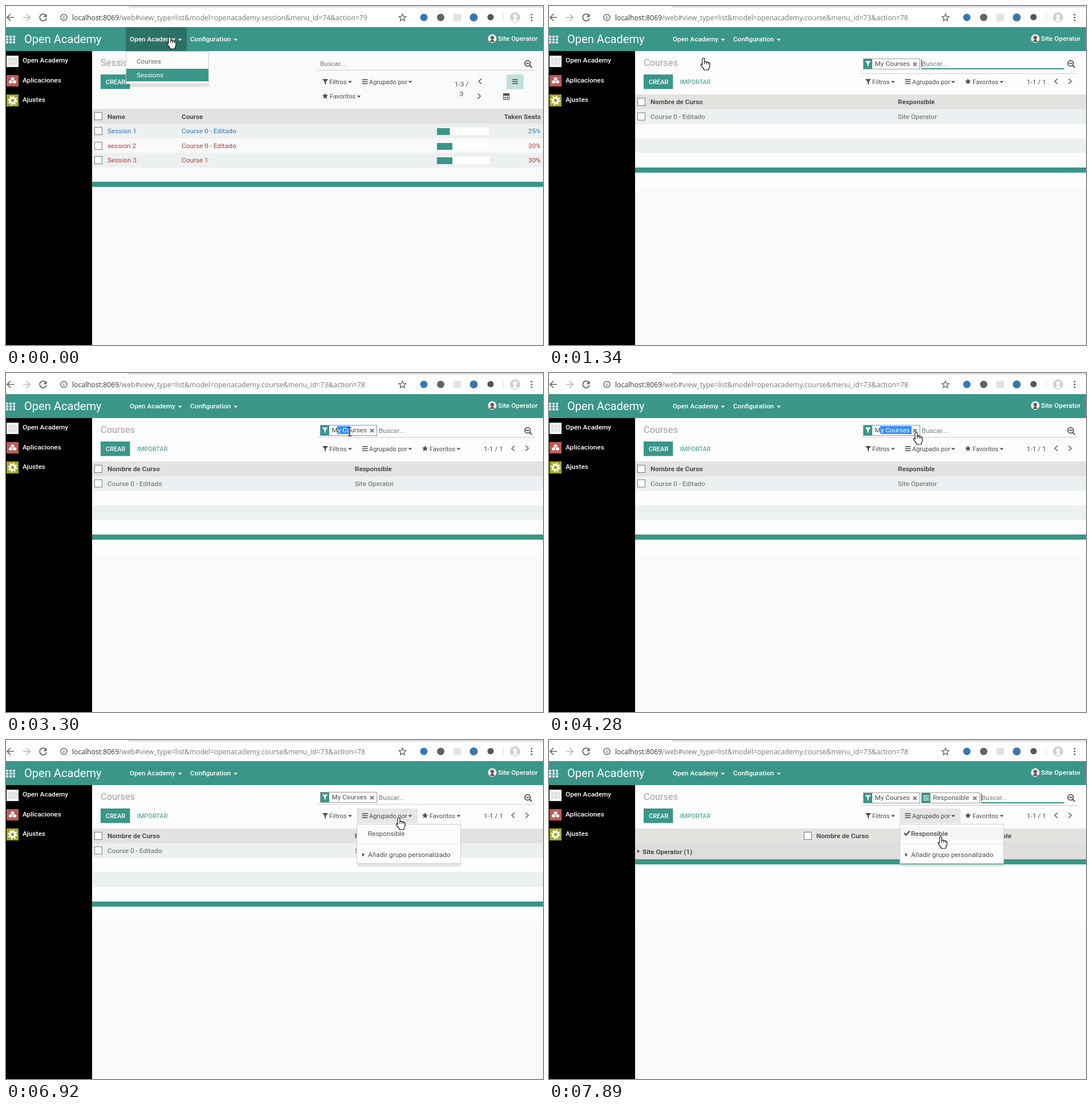
These frames come from a looping animation (942x594 px, 8 s). An HTML page:

```html
<!DOCTYPE html>
<html lang="es">
<head>
<meta charset="utf-8">
<title>Open Academy</title>
<style>
html, body { margin: 0; width: 100%; height: 100%; overflow: hidden; background: #fafafa; }
#stage { display: block; width: 100vw; height: 100vh; }
text { font-family: Roboto, sans-serif; white-space: pre; }
</style>
</head>
<body>
<svg id="stage" viewBox="0 0 942 594"></svg>
<script>
const LOOP = 8000, TEAL = '#3a9688', INK = '#4c4c4c', GREY = '#5f6368', USER = 'Site Operator';

// Cursor runs: start ms, end ms, steps, from x, y, to x, y, shape
const RUNS = [
  [0, 0, 1, 287, 54, 287, 54, 'hand'],
  [250, 920, 5, 286, 61, 271, 91, 'hand'],
  [1900, 2570, 6, 300, 92, 596, 106, 'beam'],
  [2720, 2880, 2, 588, 104, 581, 102, 'beam'],
  [3030, 3740, 6, 583, 102, 634, 104, 'beam'],
  [3890, 3890, 1, 643, 98, 643, 98, 'hand'],
  [4280, 4280, 1, 644, 104, 644, 104, 'hand'],
  [4420, 5130, 6, 605, 128, 600, 252, 'arrow'],
  [5400, 5520, 2, 604, 254, 625, 240, 'arrow'],
  [5800, 5800, 1, 737, 128, 737, 128, 'hand'],
  [5940, 6500, 5, 756, 122, 689, 136, 'hand'],
  [7040, 7440, 3, 689, 148, 687, 169, 'hand'],
];

function cursorAt(t) {
  const [start, end, steps, x0, y0, x1, y1, shape] = RUNS.findLast(run => t >= run[0]);
  const last = Math.max(steps - 1, 1);
  const step = end > start ? Math.min(last, Math.floor((t - start) / (end - start) * last + 0.3)) : 0;
  const f = step / last;
  return { x: Math.round(x0 + (x1 - x0) * f), y: Math.round(y0 + (y1 - y0) * f), shape };
}

const rect = (x, y, w, h, fill, extra = '') =>
  `<rect x="${x}" y="${y}" width="${w}" height="${h}" fill="${fill}" ${extra}/>`;
const box = (x, y, w, h, fill, stroke) => rect(x + .5, y + .5, w - 1, h - 1, fill, `stroke="${stroke}"`);
const disc = (x, y, r, fill, extra = '') => `<circle cx="${x}" cy="${y}" r="${r}" fill="${fill}" ${extra}/>`;
const shape = (d, fill, extra = '') => `<path d="${d}" fill="${fill}" ${extra}/>`;
const line = (d, stroke, width = 1) => shape(d, 'none', `stroke="${stroke}" stroke-width="${width}"`);
const text = (x, y, label, color = INK, size = 11.8, weight = 400, anchor = 'start', extra = '') =>
  `<text x="${x}" y="${y}" fill="${color}" font-size="${size}" font-weight="${weight}" text-anchor="${anchor}" ${extra}>${label}</text>`;
const bold = (x, y, label, anchor) => text(x, y, label, INK, 11.7, 700, anchor);
const at = (x, y, content) => `<g transform="translate(${x} ${y})">${content}</g>`;

const down = (x, y, color = INK) => shape(`M${x - 3.5} ${y - 1.5}h7l-3.500 3.500z`, color);
const right = (x, y) => shape(`M${x - 2} ${y - 3.5}l4 3.500-4 3.500z`, INK);
const chevron = (x, y, dir) => line(`M${x - 2.5 * dir} ${y - 4.5}l${5 * dir} 4.500l${-5 * dir} 4.500`, '#777', 1.7);
const funnel = (x, y, color) => shape(`M${x - 5} ${y - 5}h10l-4 5v5l-2-2v-3z`, color);
const bars = (x, y, color) => line(`M${x - 5} ${y - 3.5}h10m-10 3.500h10m-10 3.500h10`, color, 1.7);
const star = (x, y, r, fill, extra) => {
  const points = Array.from({ length: 10 }, (_, i) => {
    const a = i * Math.PI / 5, d = i % 2 ? r * .45 : r;
    return `${(x + d * Math.sin(a)).toFixed(1)},${(y - d * Math.cos(a)).toFixed(1)}`;
  });
  return `<polygon points="${points.join(' ')}" fill="${fill}" ${extra || ''}/>`;
};
const checkbox = (x, y) => box(x, y, 14, 14, '#fff', '#777');
const person = (x, y, r, back, front) => disc(x, y, r, back) + disc(x, y - r * .2, r * .42, front)
  + shape(`M${x - r * .6} ${y + r * .8}q${r * .6} ${-r * 1.2} ${r * 1.2} 0z`, front);

function browserBar(model, menu, action) {
  const rest = `/web#view_type=list&amp;model=openacademy.${model}&amp;menu_id=${menu}&amp;action=${action}`;
  const arrow = (x, dir, color) => line(`M${x - 6 * dir} 20h${12 * dir}m${-6 * dir}-6l${6 * dir} 6l${-6 * dir} 6`, color, 1.7);
  return rect(0, 0, 942, 37, '#fff') + shape('M214 0H942V3H218q-3 0-4-3z', '#dee1e6')
    + arrow(8, -1, GREY) + arrow(36, 1, '#b5b8bb')
    + line('M70 16.500a6 6 0 1 0 1 5', GREY, 1.8) + shape('M71.500 13.500v6h-6z', GREY)
    + disc(101.5, 20, 5.5, 'none', `stroke="${GREY}" stroke-width="1.4"`) + line('M101.500 19v4m0-6v1.300', GREY, 1.4)
    + text(116, 24.5, `<tspan fill="#333">localhost:8069</tspan>${rest}`, '#777', 12.2, 400, 'start',
      'style="font-family:\'Open Sans\',sans-serif"')
    + star(695.5, 20.5, 6.5, 'none', `stroke="${GREY}" stroke-width="1.3"`)
    + disc(733, 20, 6.5, '#3279b7') + disc(762.5, 20, 6.5, GREY) + rect(785, 13.5, 13, 13, '#e3e3e3')
    + disc(820.5, 20, 7, '#3d77a8') + disc(850, 19.5, 5.5, '#555') + rect(872, 13, 1, 14, '#ddd')
    + person(893, 20, 9, '#cfcfd4', '#f7f7f7')
    + [15, 20, 25].map(y => disc(922, y, 1.6, GREY)).join('');
}

function navigation(menuOpen) {
  let out = rect(0, 37, 942, 42, TEAL) + (menuOpen ? rect(210, 37, 107, 42, '#2b7166') : '');
  for (let i = 0; i < 9; i++) out += rect(i % 3 * 6, 52 + Math.floor(i / 3) * 5, 4, 3.5, '#fff');
  return out + text(32, 65, 'Open Academy', '#fff', 20.1)
    + text(217, 62, 'Open Academy', '#fff', 11.8, 500) + down(305, 59, '#fff')
    + text(323, 62, 'Configuration', '#fff', 11.8, 500) + down(403, 59, '#fff')
    + person(853, 57, 7.5, '#f2f2f2', '#6b5a50') + text(863, 61, USER, '#fff', 11.8, 500);
}

function sidebar() {
  const cube = (x, y) => shape(`M${x} ${y - 3.5}l3.500 1.500v4l-3.500 1.500l-3.500-1.500v-4z`, '#fff', 'stroke="#8f4644" stroke-width=".7"');
  return rect(0, 79, 151, 515, '#000')
    + rect(1, 87, 21, 20, '#f3f3f3') + box(5, 92, 13, 10, 'none', '#c9c9c9') + disc(11.5, 97, 2.5, 'none', 'stroke="#c9c9c9"')
    + rect(1, 121, 21, 20, '#c05a57') + cube(11.5, 128) + cube(8, 133) + cube(15, 133)
    + rect(1, 155, 21, 21, '#a5a71f') + disc(11.5, 165.5, 4.5, 'none', 'stroke="#fff" stroke-width="3"')
    + disc(11.5, 165.5, 7, 'none', 'stroke="#fff" stroke-width="2.600" stroke-dasharray="2.75"')
    + ['Open Academy', 'Aplicaciones', 'Ajustes'].map((s, i) => text(29, 99 + i * 34.5, s, '#fff', 11.8, 500)).join('');
}

function controls(title, stacked, groupActive) {
  const favX = stacked ? 560 : 735, favY = stacked ? 158 : 132.5;
  let out = text(166, 105, title, '#aaa197', 16.4)
    + rect(166, 120, 51.5, 25.5, TEAL) + text(175, 136.5, 'CREAR', '#fff', 11, 500)
    + text(230, 136.5, 'IMPORTAR', TEAL, 11);
  if (groupActive) out += rect(615, 120, 107, 26, '#e6e6e6');
  out += funnel(560, 133, INK) + text(567, 136.5, 'Filtros', INK, 11) + down(603.5, 133)
    + bars(629.5, 132.5, INK) + text(637, 136.5, 'Agrupado por', INK, 11) + down(709, 133)
    + star(favX, favY, 5.5, INK) + text(favX + 8, favY + 4, 'Favoritos', INK, 11) + down(favX + 59, favY + .5);
  if (!stacked) return out + text(838, 136.5, '1-1 / 1') + chevron(889.5, 132, -1) + chevron(914, 132, 1);
  return out + text(799, 141, '1-3 /', INK, 11.8, 400, 'middle') + text(799, 157.5, '3', INK, 11.8, 400, 'middle')
    + chevron(831.5, 132, -1) + chevron(830, 158, 1)
    + rect(878, 120, 30, 26, '#c4e0db') + bars(893, 132.5, INK)
    + box(872, 153, 11, 11, 'none', INK) + rect(872, 154, 11, 3, INK) + line('M872 160.500h11m-7.500-3v7m4-7v7', INK, .8);
}

function facet(x, y, width, label, icon, selectedTo) {
  const selected = selectedTo !== undefined;
  let out = box(x, y, width, 19, '#fff', selected ? '#5b9bdc' : '#999') + rect(x + 1, y + 1, 15, 17, TEAL)
    + icon(x + 8.5, y + 9.5, '#fff') + text(x + 20.5, y + 13, label, INK, 11.7);
  if (selected) {
    const left = x + 30;
    out += `<svg x="${left}" y="${y + 2}" width="${Math.max(selectedTo - left, 0)}" height="14">`
      + rect(0, 0, 99, 14, '#3390ff') + text(-9.5, 11, label, '#fff', 11.7) + '</svg>';
  }
  const cx = x + width - 9;
  return out + line(`M${cx - 3} ${y + 7}l6 6m0-6l-6 6`, '#777', 2);
}

function search({ courses, grouped, focused, caret, selectedTo }) {
  const y = focused ? 92 : 91;
  const inputX = grouped ? 759 : courses ? 654 : 551;
  let out = rect(547, grouped ? 114 : focused ? 118 : 112, 380, 1, '#ccc');
  if (courses) out += facet(551, y, 100, 'My Courses', funnel, selectedTo);
  if (grouped) out += facet(653, y, 103, 'Responsible', bars);
  if (focused) out += rect(inputX - 1, 109, 905 - inputX, 2, TEAL);
  if (caret) out += rect(inputX - 1, 94, 1, 13, '#222');
  return out + text(inputX, 105, 'Buscar...', '#777', 11.7)
    + disc(915, 100.5, 4.8, 'none', `stroke="${INK}" stroke-width="1.8"`) + line('M912.500 100.500h5m1 3.500l4 4', INK, 1.8);
}

function sessionList() {
  const rows = [['Session 1', 'Course 0 - Editado', 25, '#337ab7'], ['session 2', 'Course 0 - Editado', 30, '#b03f3c'],
    ['Session 3', 'Course 1', 30, '#b03f3c']];
  return rect(151, 180, 791, 26, '#e2e2e0') + checkbox(155, 186) + bold(178, 197.5, 'Name') + bold(308, 197.5, 'Course')
    + bold(938, 197.5, 'Taken Seats', 'end')
    + rows.map(([name, course, seats, color], i) => {
      const y = 206 + Math.round(i * 25.5);
      return rect(151, y, 791, 26, i % 2 ? '#fafafa' : '#ecf0f0') + checkbox(155, y + 6)
        + text(178, y + 17, name, color) + text(308, y + 17, course, color)
        + rect(756, y + 7, 91, 13, '#fff') + rect(756, y + 8, seats * .9, 12, TEAL)
        + text(938, y + 17, seats + '%', color, 11.8, 400, 'end');
    }).join('') + rect(151, 308, 791, 9, TEAL);
}

function courseList(hover) {
  const sortMark = x => down(x, 168, '#999');
  return rect(151, 155, 791, 26, '#e2e2e0')
    + (hover === 'name' ? rect(174, 155, 434, 26, '#d5d5d3') + sortMark(279) : '')
    + (hover === 'responsible' ? rect(608, 155, 334, 26, '#d5d5d3') + sortMark(685.5) : '')
    + checkbox(155, 161) + bold(178, 172, 'Nombre de Curso') + bold(612, 172, 'Responsible')
    + rect(151, 181, 791, 26, '#ecf0f0') + checkbox(155, 186.5)
    + text(178, 197.5, 'Course 0 - Editado', '#666') + text(612, 197.5, USER, '#666')
    + rect(151, 232, 791, 25.5, '#ecf0f0') + rect(151, 283, 791, 9, TEAL);
}

function groupedList() {
  return rect(151, 155, 791, 26, '#e2e2e0') + checkbox(447, 161) + bold(469, 172, 'Nombre de Curso')
    + bold(811, 172, 'Responsible', 'end')
    + rect(151, 181, 791, 28, '#dedede') + right(157, 195) + bold(164, 199.5, USER + ' (1)')
    + rect(151, 209, 791, 9, TEAL);
}

const panel = (x, y, w, h) => rect(x + 2, y + 4, w - 2, h + 1, '#000', 'opacity=".1" rx="3"') + box(x, y, w, h, '#fcfcfc', '#ccc');

const academyMenu = hover => panel(210, 79, 146, 58) + (hover ? rect(211, 86, 144, 22, '#eee') : '')
  + text(229, 101, 'Courses', '#666', 11.7) + rect(211, 110, 144, 22, TEAL) + text(229, 124.5, 'Sessions', '#fff', 11.7);

const groupMenu = (checked, hover) => panel(615, 147, 183, 70) + (hover ? rect(616, 153, 181, 21, '#f5f5f5') : '')
  + (checked ? line('M623 163l3.500 3.500l6-7', INK, 2.4) : '')
  + text(635, 167.5, 'Responsible', INK, 11.8, checked ? 500 : 400) + rect(616, 182, 181, 1, '#e5e5e5')
  + right(627, 201) + text(635, 204.5, 'Añadir grupo personalizado');

const CURSORS = {
  hand: shape('M-2 2a2 2 0 0 1 4 0v5c1-1 3-1 3.500.5 1-.8 2.700-.5 3 .8 1.200-.6 2.500 0 2.500 1.700v4c0 3-2 4-2 7h-8c0-3-5-6-5.500-9-.2-1.500 1.500-2 2.500-.5z',
    '#fff', 'stroke="#111" stroke-width="1.200"') + line('M2 7v4m3.500-3v3m3-2v2.500', '#111'),
  beam: line('M-3-7.500h2.500q.5 0 .5 1v13q0 1-.5 1H-3M3-7.500H.5m2.500 15H.5', '#111', 1.2),
  arrow: shape('M0 0v16.500l3.800-3.600 2.700 6 2.600-1.200-2.700-5.800h5.200z', '#fff', 'stroke="#111"'),
};

function scene(t) {
  const courses = t >= 1340, grouped = t >= 7740;
  const cursor = cursorAt(t), { x, y } = cursor;
  const academyOpen = t < 920, groupOpen = t >= 6920;
  const typing = courses && t < 3030;
  const selecting = t >= 3030 && t < 5400;
  const overGroup = x >= 615 && x <= 721 && y >= 120 && y <= 146;
  const hover = t >= 5800 && t < 5940 ? 'responsible'
    : cursor.shape === 'arrow' && y > 155 && y < 181 ? 'name' : '';
  return rect(0, 0, 942, 594, '#fafafa') + (courses ? rect(151, 79, 791, 239, '#fdfdfd') : '')
    + browserBar(...(courses ? ['course', 73, 78] : ['session', 74, 79]))
    + navigation(academyOpen) + sidebar()
    + controls(courses ? 'Courses' : 'Sessions', !courses, groupOpen || overGroup)
    + search({
      courses, grouped, focused: typing || grouped,
      caret: grouped || typing && Math.floor((t - 1340) / 530) % 2 === 0,
      selectedTo: selecting ? Math.min(x, 636) : undefined,
    })
    + (grouped ? groupedList() : courses ? courseList(hover) : sessionList())
    + (academyOpen ? academyMenu(y > 86) : '')
    + (groupOpen ? groupMenu(grouped, y > 155) : '')
    + at(x, y, CURSORS[cursor.shape]);
}

const stage = document.getElementById('stage');
let shown = '';
function tick() {
  const markup = scene(performance.now() % LOOP);
  if (markup !== shown) stage.innerHTML = shown = markup;
  requestAnimationFrame(tick);
}
tick();
</script>
</body>
</html>
```
